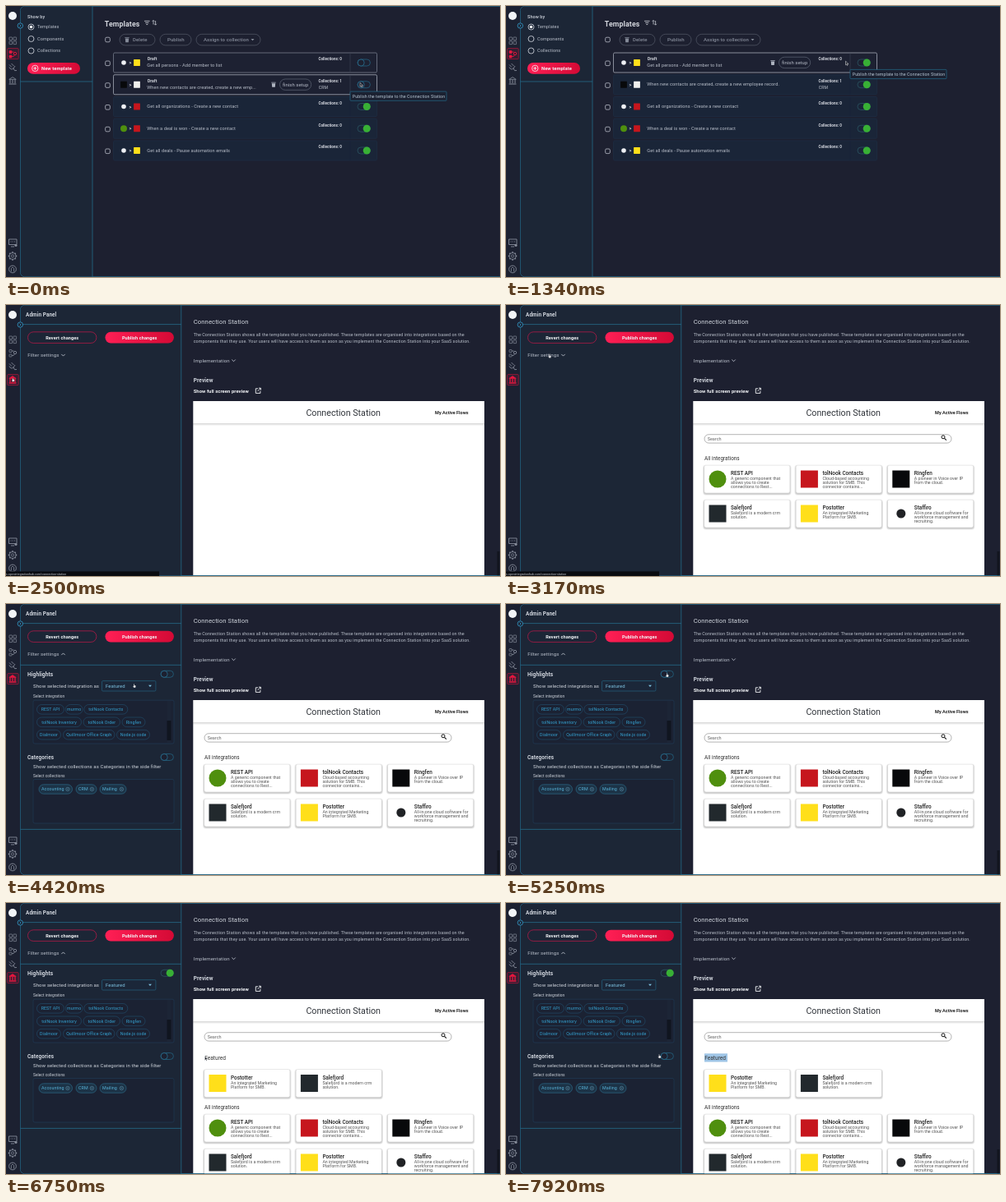
These frames come from a looping animation (600x330 px, 8 s). An HTML page:

```html
<!DOCTYPE html>
<html lang="en">
<head>
<meta charset="utf-8">
<title>Template publishing</title>
<style>
html, body { margin: 0; width: 100%; height: 100%; overflow: hidden; background: #1d2030; }
svg { display: block; width: 100vw; height: 100vh; }
text { font-family: Roboto, "Open Sans", sans-serif; white-space: pre; }
.ui text { letter-spacing: .012em; }
</style>
</head>
<body>
<svg id="stage" viewBox="0 0 600 330">
  <defs>
    <linearGradient id="glow">
      <stop offset="0" stop-color="#ff1f55"/><stop offset="1" stop-color="#d40a35"/>
    </linearGradient>
  </defs>
  <g class="ui">
    <g id="base"></g><g id="nav"></g><g id="page"></g>
  </g>
  <g id="preview"></g>
  <g id="over" class="ui"></g>
  <g id="cursor"></g>
</svg>
<script>
const LOOP = 8000;
const BLUE = '#256a8a', CYAN = '#35a0cf', RED = '#e8173f', GREEN = '#38b035';
const GREY = '#858b99', SOFT = '#b9bfca', LIGHT = '#d0d5dd', WHITE = '#f2f4f7';
const BG = '#1d2030', PANEL = '#1c2636';

// Drawing helpers
const text = (x, y, s, size, fill = SOFT, weight = 400, anchor = 'start') =>
  `<text x="${x}" y="${y}" font-size="${size}" fill="${fill}" font-weight="${weight}" text-anchor="${anchor}">${s}</text>`;
const box = (x, y, w, h, r = 0, fill = 'none', stroke = 'none', sw = .7) =>
  `<rect x="${x}" y="${y}" width="${w}" height="${h}" rx="${r}" fill="${fill}" stroke="${stroke}" stroke-width="${sw}"/>`;
const disc = (x, y, r, fill = 'none', stroke = 'none', sw = .7) =>
  `<circle cx="${x}" cy="${y}" r="${r}" fill="${fill}" stroke="${stroke}" stroke-width="${sw}"/>`;
const path = (d, stroke = GREY, sw = .8, fill = 'none') =>
  `<path d="${d}" fill="${fill}" stroke="${stroke}" stroke-width="${sw}" stroke-linejoin="round"/>`;
const at = (x, y, s) => `<g transform="translate(${x} ${y})">${s}</g>`;
const chevron = (x, y, up) => path(up ? `M${x - 2.2} ${y + 1.1}l2.2 -2.2l2.2 2.2` : `M${x - 2.2} ${y - 1.1}l2.2 2.2l2.2 -2.2`, SOFT, .9);
const caret = (x, y, fill) => path(`M${x - 2} ${y - 1}h4l-2 2.2z`, 'none', 0, fill);
const check = y => box(120.7, y - 2.8, 5.6, 5.6, 1.4, 'none', '#b9bdc8', .8);
const trash = (x, y, c) => path(`M${x - 2.2} ${y - 1.6}h4.4l-.4 4.6h-3.6z M${x - 2.7} ${y - 3}h5.4v.7h-5.4z`, 'none', 0, c);

function toggle(x, y, on) {
  const pill = box(x, y - 4, 15.4, 8, 4, 'none', on ? '#2d5b68' : BLUE, .7);
  return pill + (on ? disc(x + 11.2, y, 4.5, GREEN) : disc(x + 4.2, y, 4, BG, '#2b7ba0', .7));
}

const layers = {};
function layer(id, html) {
  if (layers[id] === html) return;
  layers[id] = html;
  document.getElementById(id).innerHTML = html;
}

// Products
const HUB = 'Connection Station';
const apps = {
  rest: { name: 'REST API', color: '#4f8f0e', round: true,
    about: ['A generic component that', 'allows you to create', 'connections to Rest...'] },
  books: { name: 'tolNook Contacts', color: '#c6161d',
    about: ['Cloud-based accounting', 'solution for SMB. This', 'connector contains...'] },
  voice: { name: 'Ringfen', color: '#08090b', about: ['A pioneer in Voice over IP', 'from the cloud.'] },
  deals: { name: 'Salefjord', color: '#22292d', tint: '#eef0f4',
    about: ['Salefjord is a modern crm', 'solution.'] },
  mail: { name: 'Postotter', color: '#ffdf1a', about: ['An integrated Marketing', 'Platform for SMB.'] },
  staff: { name: 'Staffiro', color: '#202225', tint: '#f1f1ee', small: true,
    about: ['All-in-one cloud software for', 'workforce management and', 'recruiting.'] }
};
const rows = [
  ['deals', 'mail', 'Get all persons - Add member to list'],
  ['voice', 'staff', 'When new contacts are created, create a new employee record.'],
  ['deals', 'books', 'Get all organizations - Create a new contact'],
  ['rest', 'books', 'When a deal is won - Create a new contact'],
  ['deals', 'mail', 'Get all deals - Pause automation emails']
];

function base() {
  return box(0, 0, 600, 330, 0, '#1c2131') + box(17.5, .4, 590, 329.2, 5, BG, BLUE, .8) + disc(8, 12, 5, WHITE);
}

function gear(x, y) {
  const teeth = Array.from({ length: 8 }, (_, i) => {
    const a = i * Math.PI / 4, c = Math.cos(a), s = Math.sin(a);
    return `M${x + 4 * c} ${y + 4 * s}L${x + 5.2 * c} ${y + 5.2 * s}`;
  }).join('');
  return path(teeth, GREY, 1.8) + disc(x, y, 4, 'none', GREY, .8) + disc(x, y, 1.6, 'none', GREY, .8);
}

function nav(active, hot) {
  const isAdmin = active === 'admin';
  const bank = isAdmin ? RED : hot ? WHITE : GREY;
  const flow = isAdmin ? GREY : RED, fill = isAdmin ? 'none' : RED;
  return [[4, 38], [9, 38], [4, 43], [9, 43]].map(([x, y]) => box(x, y, 3.6, 3.6, .4, 'none', GREY)).join('') +
    box(1.6, isAdmin ? 84.6 : 51.6, 13.6, 13, 1, 'rgba(232,23,63,.1)', '#b3173b', .7) +
    box(4, 54.5, 3, 3, .5, fill, flow) + box(4, 60, 3, 3, .5, fill, flow) + disc(11, 58, 1.7, 'none', flow, .9) +
    path('M7 56h2.5M7 61.5h2.2l1.2 -2', flow) +
    path('M4 71.5l3 3M6.5 70l3 3M4 74.5q2 4 5 1.5l2 -3M9 76q1 4 4 2.5', GREY, .9) +
    path('M3.8 89.4l4.2 -2.8l4.2 2.8z', bank, .8, isAdmin ? bank : 'none') +
    path('M5 90v4M8 90v4M11 90v4M3.6 95h8.8', bank, isAdmin ? 1.3 : 1) +
    path('M3.5 284h9.5v6.5h-9.5zM6 293h4M5.5 287h1M7.7 287h1M10 287h1', GREY, .9) + disc(12, 291.5, 1.6, GREY) +
    gear(8, 304.5) +
    disc(8, 320.5, 4.4, 'none', GREY, .9) + path('M6.4 323.5v-4q1.6 -3 3.2 0v4', GREY, .8);
}

const handle = disc(17.3, 24, 3.2, BG, CYAN, .8) + path('M16.5 22.5l1.6 1.5l-1.6 1.5', CYAN, .8);

// Side panel with a rounded left edge
const side = right => path(`M${right} .8H22.5a4.6 4.6 0 0 0 -4.6 4.6V324.6a4.6 4.6 0 0 0 4.6 4.6H${right}z`, 'none', 0, PANEL) +
  path(`M${right} 0V330`, BLUE, .8);

function badge(x, y, key) {
  const { color, tint, round } = apps[key];
  if (key === 'deals') return disc(x, y, 2.8, tint);
  return round ? disc(x, y, 4, color) : box(x - 3.9, y - 3.9, 7.8, 7.8, .3, tint || color);
}

function row(i, { draft, hover, on }) {
  const y = 69 + i * 26.75;
  const [from, to, title] = rows[i];
  const edge = hover && draft ? '#a4a9b5' : draft ? '#777d8c' : '#1d2d42';
  const shown = draft && hover && i === 1 ? title.slice(0, 47) + '...' : title;
  let s = check(y + .8) + box(130.5, y - 12, 320, 24, 1.5, draft ? '#1d2132' : '#1a2538', edge, .8) +
    path(`M418 ${y - 11.5}v23`, draft ? '#3d4456' : '#18203a', .6) +
    badge(143, y, from) + text(149.5, y + 2, '&gt;', 5.5, WHITE, 500) + badge(159, y, to) +
    text(171.3, y + (draft ? 5 : 1.7), shown, 5.6) +
    text(379.5, y - 2.6, `Collections: ${i === 1 ? 1 : 0}`, 4.5, '#d9dce3', 700) +
    toggle(427, y, on);
  if (i === 1) s += text(379.7, y + 5, 'CRM', 5.2);
  if (draft) s += text(172, y - 2.6, 'Draft', 5, '#d9dce3', 700);
  if (draft && hover) {
    const x = 324 + i;
    s += trash(x, y, '#aeb4c0') + box(x + 7.5, y - 6.8, 38.2, 13.4, 6.7, 'none', '#5e6575') +
      text(x + 26.6, y + 2, 'finish setup', 5.9, SOFT, 400, 'middle');
  }
  return s;
}

function templates(states) {
  const radio = (y, label, on) => disc(30.5, y, 3.5, 'none', '#c7cbd4', .9) +
    (on ? disc(30.5, y, 1.8, WHITE) : '') + text(38, y + 1.9, label, 5.55);
  const button = (x, w, label, tx) => box(x, 34.3, w, 13.6, 6.8, 'none', '#555b69') + text(tx, 43.1, label, 6.05, GREY, 500);
  return side(105) + path('M17.5 92H105', BLUE, .8) + handle +
    text(26, 15, 'Show by', 5.5, LIGHT, 500) +
    radio(25.5, 'Templates', true) + radio(40, 'Components') + radio(54.5, 'Collections') +
    box(26, 69, 64, 13.8, 6.9, 'url(#glow)') + disc(35.3, 75.9, 3.7, 'none', WHITE, .8) +
    path('M33.3 75.9h4M35.3 73.9v4', WHITE, .9) + text(43, 77.9, 'New template', 5.8, WHITE, 700) +
    text(119.8, 24.5, 'Templates', 8.8, '#d3d6dd', 600) +
    path('M168 18.3h6.6M169.2 20.4h4.2M170.3 22.5h2', '#c3c7d0', .9) +
    path('M179 22.5v-5M177.7 18.8l1.3 -1.4l1.3 1.4M181.6 18v5M180.3 21.8l1.3 1.4l1.3 -1.4', '#c3c7d0', .8) +
    check(41) + button(138, 43, 'Delete', 154) + trash(147, 41.2, GREY) +
    button(187, 38, 'Publish', 196) + button(231, 78, 'Assign to collection', 240) + caret(299.5, 41, GREY) +
    states.map((st, i) => row(i, st)).join('');
}

function settings(highlight) {
  const chip = (x, y, w, s) => box(x, y - 5.8, w, 11.6, 5.8, 'none', '#23587a', .5) +
    text(x + w / 2, y + 1.9, s, 5.3, CYAN, 400, 'middle');
  const tag = (x, w, s) => box(x, 219.8, w, 11.4, 5.7, '#1c3347', '#2f7391', .6) +
    text(x + 3, 227.4, s, 5.35, '#58b2d8') + disc(x + w - 5.6, 225.5, 2.2, 'none', '#6a9fb8', .5) +
    path(`M${x + w - 6.5} 224.6l1.8 1.8m0 -1.8l-1.8 1.8`, '#6a9fb8', .5);
  return path('M17.5 74.3H213M17.5 274.4H213', BLUE, .8) +
    text(26, 87.7, 'Highlights', 6.6, LIGHT, 700) + toggle(188, 85.3, highlight) +
    text(33, 102, 'Show selected integration as', 6.1, LIGHT) +
    box(116.5, 93.6, 65.4, 12.4, 1.2, '#1b2739', BLUE, .6) + text(121, 102, 'Featured', 5.9, '#7fc5e4') + caret(175, 99.8, '#7fc5e4') +
    text(33, 114.3, 'Select integration', 4.8, LIGHT) + box(33, 117.2, 171, 52.8, 2, '#1b2233', '#213f59', .6) +
    chip(37.5, 128.3, 33, 'REST API') + chip(72.4, 128.3, 20.6, 'murmo') + chip(94.8, 128.3, 53, 'tolNook Contacts') +
    chip(37.5, 143.8, 54, 'tolNook Inventory') + chip(94, 143.8, 44.5, 'tolNook Order') + chip(141, 143.8, 28, 'Ringfen') +
    chip(37.5, 159.2, 29, 'Dialmoor') + chip(69.5, 159.2, 62.5, 'Quillmoor Office Graph') + chip(134.5, 159.2, 40, 'Node.js code') +
    box(195.5, 118, 5, 51, 0, '#1c2536') + box(195.5, 142, 5, 24, 0, '#10151f') +
    text(26, 188.8, 'Categories', 6.4, LIGHT, 700) + toggle(188, 186.5, false) +
    text(33, 200.4, 'Show selected collections as Categories in the side filter', 6.05, LIGHT) +
    text(33, 210.9, 'Select collections', 4.8, LIGHT) + box(33, 213.5, 171, 53.5, 2, '#1b2233', '#213f59', .6) +
    tag(40, 40.5, 'Accounting') + tag(85, 25, 'CRM') + tag(114, 32, 'Mailing');
}

function admin(open, highlight) {
  const button = (x, label, fill, stroke) => box(x, 32.8, 83.4, 13.6, 6.8, fill, stroke, .7) +
    text(x + 41.7, 41.5, label, 5.6, WHITE, 700, 'middle');
  return side(212.8) + path('M17.5 23.6H213', BLUE, .8) + handle +
    text(24, 14.3, 'Admin Panel', 6.4, LIGHT, 700) +
    button(26.5, 'Revert changes', 'none', '#c4194a') + button(120.5, 'Publish changes', 'url(#glow)', 'none') +
    text(26.2, 63.2, 'Filter settings', 6.15) + chevron(69.5, 61, open) +
    (open ? settings(highlight) : '') +
    text(227.7, 23.2, HUB, 7.7, LIGHT) +
    text(227.7, 37.7, `The ${HUB} shows all the templates that you have published. These templates are organised into integrations based on the`, 5.38) +
    text(227.7, 45.9, `components that they use. Your users will have access to them as soon as you implement the ${HUB} into your SaaS solution.`, 5.38) +
    text(227.7, 69.7, 'Implementation', 6.15) + chevron(276.5, 67.6) +
    text(227.7, 93.8, 'Preview', 6.5, LIGHT, 700) +
    text(227.7, 106.6, 'Show full screen preview', 5.85, WHITE, 700) +
    path('M306 101.8h-2.7v5.6h5.6v-2.7M307 101.2h2.4v2.4M309.2 101.4l-3.6 3.6', WHITE, .9) +
    box(596.5, 300, 3, 30, 0, '#12151e');
}

function card(col, y, key) {
  const a = apps[key], x = 241 + col * 111.4, cy = y + 16.5;
  const mark = a.round ? disc(x + 16, cy, 10.5, a.color)
    : a.small ? disc(x + 16, cy, 5.5, a.color) : box(x + 5.5, cy - 10.5, 21, 21, 0, a.color);
  const shadow = [2, 1.3, .6].map(d => box(x - d, y + 1 - d, 103.6 + 2 * d, 33.3 + 2 * d, 2 + d, 'rgba(0,0,0,.07)')).join('');
  return shadow + box(x, y, 103.6, 33.3, 2, '#fff') + mark +
    text(x + 32, y + 11.7, a.name, 6.4, '#222', 500) +
    a.about.map((s, i) => text(x + 32, y + 17.9 + i * 4.8, s, 5.25, '#555')).join('');
}

function preview(filled, featured, sel) {
  let s = box(227.3, 117, 353.7, 212.2, 0, '#fff');
  s += [0, 1, 2].map(i => box(227.3, 144 + i, 353.7, 1, 0, `rgba(0,0,0,${.14 - i * .05})`)).join('') +
    text(409.7, 134.5, HUB, 10.7, '#30343a', 400, 'middle') + text(561.5, 132.6, 'My Active Flows', 5.5, '#222', 700, 'end');
  if (filled) {
    const dy = featured ? 62 : 0;
    s += box(241, 157.7, 300, 10.4, 5.2, '#fff', '#777', .55) + text(244.7, 164.9, 'Search', 5.5, '#666') +
      disc(531, 160.8, 2, 'none', '#111', 1) + path('M532.5 162.3l2.4 2.4', '#111', 1.1);
    if (featured) s += (sel > 0 ? box(241, 183.3, 28 * sel, 10.2, 0, '#9fc5e6') : '') +
      text(241.2, 190.5, 'Featured', 6.6, '#333') + card(0, 203, 'mail') + card(1, 203, 'deals');
    s += text(241, 188.6 + dy, 'All integrations', 6.4, '#333');
    s += ['rest', 'books', 'voice', 'deals', 'mail', 'staff']
      .map((k, i) => card(i % 3, 195.5 + dy + Math.floor(i / 3) * 42, k)).join('');
  }
  return s + path('M213 329.6H600', BLUE, .8);
}

const tooltip = y => box(418, y - 5.6, 117, 11.2, .8, '#1b2131', BLUE) +
  text(420.8, y + 1.9, `Publish the template to the ${HUB}`, 5.3, '#b5c4d2');

const status = s => box(0, 324.4, 186, 5.6, 0, '#0a0c11') + text(0, 328.7, s, 3.5, '#c8ccd3');

// Pointer stops: time, x, y
const stops = [[0, 430, 93.5], [420, 431, 94], [800, 430, 69], [1080, 431, 68], [1340, 412.5, 67.2], [1480, 404, 69],
  [2130, 8, 89], [2480, 8, 89], [3050, 52.5, 60], [3420, 53, 60], [4180, 146, 96], [4420, 155.5, 97.5],
  [4900, 158, 97], [5300, 197, 84], [5480, 198, 85], [5840, 205.5, 98], [6550, 241.5, 187],
  [6750, 241.5, 187], [7080, 268, 188], [7300, 268, 188], [7880, 186, 184.5], [8000, 186, 184.5]];

function pointer(t) {
  const i = Math.max(1, stops.findIndex(p => p[0] > t));
  const [a, b] = [stops[i - 1], stops[i]];
  const k = (t - a[0]) / (b[0] - a[0]), e = k * k * (3 - 2 * k);
  return [a[1] + (b[1] - a[1]) * e, a[2] + (b[2] - a[2]) * e];
}

const arrow = path('M0 0v4.6l1.1 -1l.8 1.7l.8 -.4l-.8 -1.6h1.6z', WHITE, .5, '#10131b');
const hand = path('M-.4 0q.5 -.5 .9 0v1.4l1.6 .4v1.5l-.5 1.1h-1.8l-1.2 -1.7l.4 -.4l.6 .4z', '#20242e', .3, WHITE);

function draw(t) {
  const within = (a, b) => t >= a && t < b;
  const onAdmin = t >= 2420;
  layer('nav', nav(onAdmin ? 'admin' : 'templates', t > 2080));
  if (onAdmin) {
    const sel = Math.min(1, Math.max(0, (t - 6750) / 330));
    layer('page', admin(t >= 3260, t >= 5420));
    layer('preview', preview(within(2720, 5500) || t >= 6250, t >= 6250, sel));
  } else {
    const done = { draft: false, hover: false, on: true };
    layer('page', templates([
      { draft: t < 1430, hover: within(640, 1480), on: t >= 1040 },
      { draft: t < 420, hover: t < 620, on: t >= 200 },
      done, done, done
    ]));
    layer('preview', '');
  }
  layer('over', t < 520 ? tooltip(109.7) : within(820, 1430) ? tooltip(83) :
    within(2130, 2330) ? status('s.openintegrationhub.com...') :
    within(2330, 3260) ? status('s.openintegrationhub.com/connection-station') : '');
  const linked = within(2080, 2560) || within(2980, 3560) || within(4250, 5560) || t > 7840;
  const [x, y] = pointer(t);
  layer('cursor', at(x.toFixed(2), y.toFixed(2), linked ? hand : arrow));
}

layer('base', base());
const start = performance.now();
function tick() {
  draw((performance.now() - start) % LOOP);
  requestAnimationFrame(tick);
}
tick();
</script>
</body>
</html>
```
